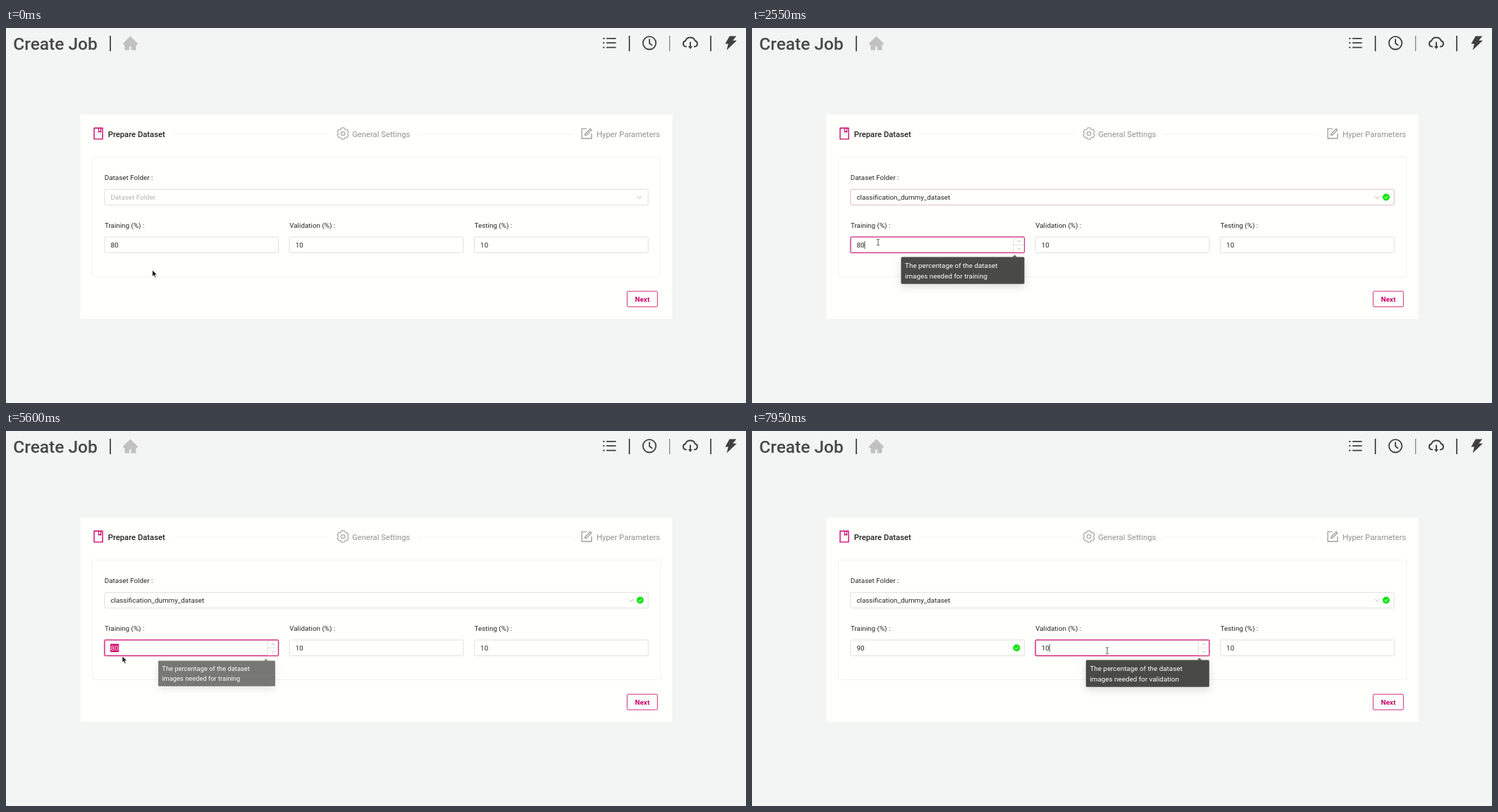
Write an HTML page that moves like this. It is 1050 px wide and 533 px high and loops after 8000 ms.

```html
<!DOCTYPE html>
<html lang="en">
<head>
<meta charset="utf-8">
<title>Create Job</title>
<style>
  html, body { margin: 0; height: 100%; overflow: hidden; background: #f3f5f4; }
  svg { display: block; width: 100vw; height: 100vh; font: 9.85px Roboto, sans-serif; fill: #262626; }
  .line { fill: none; stroke: #d9d9d7; stroke-width: .8; }
  .pink { fill: none; stroke: #d02c80; stroke-width: 1; }
  .glow { fill: none; stroke: #e0569b; stroke-width: 2.2; stroke-opacity: .55; }
  .thin { fill: none; stroke: #bdbdbb; stroke-width: 1; }
  .step { font-size: 11.25px; fill: #929292; }
  .tip { filter: drop-shadow(0 4px 6px rgba(0,0,0,.14)); }
  .tip text { fill: #fff; }
</style>
</head>
<body>
<svg viewBox="0 0 1050 533" id="stage">
  <text x="10.3" y="30.5" font-size="24.5" font-weight="500" fill="#474747">Create Job</text>
  <path d="M148 11v22M884.5 11v22M1000 11v22" stroke="#222" stroke-width="1.5"/>
  <path d="M941.7 11v22" stroke="#555" stroke-width=".9"/>
  <path transform="translate(164.6 9.8) scale(.0231)" fill="#c1c1c1" d="M946.5 505L534.6 93.5a32 32 0 0 0-45.2 0L77.5 505c-12 12-18.8 28.3-18.8 45.3 0 35.3 28.7 64 64 64h43.4V908c0 17.7 14.3 32 32 32H448V716h112v224h265.9c17.7 0 32-14.3 32-32V614.3h43.4c17 0 33.3-6.7 45.3-18.8 24.9-25 24.9-65.5-.1-90.5z"/>
  <g fill="none" stroke="#404040" stroke-width="1.8">
    <path d="M852 14.8h13.5M852 21.2h13.5M852 27.6h13.5M847 14.8h2.4M847 21.2h2.4M847 27.6h2.4"/>
    <circle cx="913" cy="21.3" r="9.2"/>
    <path d="M913 15.5v6.3l4 3"/>
  </g>
  <g transform="translate(957.9 8) scale(.0255)" fill="#404040">
    <path fill="none" stroke="#404040" stroke-width="76" d="M312 722H264a162 162 0 0 1-23-318A290 290 0 0 1 783 404 162 162 0 0 1 760 722H712"/>
    <path d="M624 706h-74V456h-76v250h-82l120 158 120-158z"/>
  </g>
  <path transform="translate(1016.5 9.2) scale(.0237)" fill="#404040" d="M848 359H628L826 109c4-5 0-13-6-13H436c-3 0-6 2-7 4L170 547c-3 5 1 12 7 12h174l-89 358c-2 8 8 13 13 8L853 373c6-5 2-14-5-14z"/>

  <rect x="105.5" y="123" width="840" height="290.5" fill="#fffffc"/>
  <path d="M236 151h222M584 151h220" stroke="#f1f1ee" stroke-width=".9"/>
  <rect x="122.6" y="183.4" width="806" height="170" rx="2" fill="none" stroke="#f0f0ed" stroke-width=".9"/>
  <path transform="translate(121.3 140.3) scale(.019)" fill="#c9006a" fill-rule="evenodd" d="M832 64H192c-18 0-32 14-32 32v832c0 18 14 32 32 32h640c18 0 32-14 32-32V96c0-18-14-32-32-32zM572 136h96v210l-46-34-50 35zM792 888H232V136h280v297c0 13 14 21 25 13l84-60 82 59c10 8 25 0 25-13V136h64z"/>
  <path id="gear" fill="none" stroke="#a9a9a7" stroke-width="1.25" stroke-linejoin="round"/>
  <circle cx="478.1" cy="150" r="2.7" fill="none" stroke="#a9a9a7" stroke-width="1.25"/>
  <g transform="translate(814.2 140.3) scale(.019)" fill="none" stroke="#a0a09e" stroke-width="72">
    <path d="M508 148H148v728h728V512M392 540l388-386 90 90-388 386-92 3z"/>
  </g>
  <text class="step" x="144.7" y="154.7" style="font-weight:500;fill:#222">Prepare Dataset</text>
  <text class="step" x="491.2" y="154.7">General Settings</text>
  <text class="step" x="837.9" y="154.7">Hyper Parameters</text>

  <text x="139.8" y="215.7">Dataset Folder :</text>
  <g id="folder"></g>
  <path id="chevron" class="thin" d="M-3.2-1.7L0 2l3.2-3.7"/>
  <g id="fields"></g>

  <rect x="881.3" y="374.2" width="43" height="22" rx="1.5" fill="#fffffc" stroke="#cb2a7c" stroke-width="1"/>
  <text x="892.6" y="388.5" font-weight="600" fill="#c9006a">Next</text>

  <g id="menu">
    <rect x="139.9" y="254.5" width="771.2" height="28" rx="1.5" fill="#fffffc" style="filter:drop-shadow(0 3px 5px rgba(0,0,0,.14))"/>
    <rect x="139.9" y="257.3" width="771.2" height="22.4" fill="#f4f4f3"/>
    <text x="148.4" y="271.9">classification_dummy_dataset</text>
  </g>
  <g id="tips"></g>
  <path id="arrow" d="M0 0v9.2l2.1-1.9 1.5 3.4 1.6-.7-1.5-3.3h2.9z" fill="#111" stroke="#fff" stroke-width=".7"/>
  <path id="beam" d="M-2-4.2h1.3l.7.6.7-.6H2M0-3.6v7.4M-2 4.4h1.3l.7-.6.7.6H2" fill="none" stroke="#444" stroke-width=".9"/>
</svg>
<script>
const $ = id => document.getElementById(id);
const set = (id, attrs) => { for (const k in attrs) $(id).setAttribute(k, attrs[k]); };
const show = (id, alpha) => set(id, { opacity: alpha });
const ramp = (t, a, b) => Math.min(1, Math.max(0, (t - a) / (b - a)));
const pulse = (t, a, b, c, d) => ramp(t, a, b) - ramp(t, c, d);

// Six gear teeth
let gear = '';
for (let i = 0; i < 6; i++)
  for (const [deg, r] of [[-22, 6.9], [-13, 8.3], [13, 8.3], [22, 6.9]]) {
    const a = (i * 60 + 30 + deg) * Math.PI / 180;
    gear += (gear ? 'L' : 'M') + (478.1 + r * Math.cos(a)) + ' ' + (150 + r * Math.sin(a));
  }
set('gear', { d: gear + 'z' });

const box = (cls, id, x, y, w, h) =>
  `<rect class="${cls}" id="${id}" x="${x}" y="${y}" width="${w}" height="${h}" rx="1.5"/>`;
const check = id => `<g id="${id}"><circle r="5" fill="#10e510"/>
  <path d="M-2.2.1l1.6 1.7 2.7-3.3" fill="none" stroke="#fff" stroke-width="1"/></g>`;

function frame(name, x, y, w, h) {
  return box('line', name + 'Line', x, y, w, h) + box('glow', name + 'Glow', x, y, w, h) +
    box('pink', name + 'Pink', x, y, w, h);
}
function field(name, label, x, value) {
  const r = x + 246.6;
  return `<text x="${x}" y="283.6">${label} (%) :</text>` + frame(name, x, 297, 246.6, 22.4) +
    `<rect id="${name}Sel" x="${x + 8.2}" y="302.6" width="11.9" height="11.6" fill="#d3006d"/>
    <text id="${name}Text" x="${x + 8.5}" y="311.7">${value}</text>
    <path id="${name}Caret" d="M0 303v11" stroke="#222" stroke-width=".8"/>` + check(name + 'Check') +
    `<g id="${name}Spin"><rect x="${r - 15.4}" y="298" width="14.4" height="20.6" fill="#fffffc"/>
    <path class="line" d="M${r - 15.4} 297.6v21.4M${r - 15.4} 308.2h15"/>
    <path class="thin" d="M${r - 9.8} 304l2.2-2 2.2 2M${r - 9.8} 312.6l2.2 2 2.2-2"/></g>`;
}
function tip(id, x, y, tail, lines) {
  const h = lines.length * 15 + 8.4;
  return `<g id="${id}" class="tip"><rect x="${x}" y="${y}" width="175" height="${h}" rx="1.5" fill="#494946"/>
    <path d="M${x + 158} ${tail < 0 ? y : y + h}l3.2 ${2.6 * tail} 3.2 ${-2.6 * tail}z" fill="#494946"/>` +
    lines.map((s, i) => `<text x="${x + 5.6}" y="${y + 15.2 + i * 15}">${s}</text>`).join('') + '</g>';
}

$('folder').innerHTML = frame('select', 139.9, 229.4, 771.2, 22.2) +
  `<text id="selectText" x="148.4" y="243.6"></text>
   <path id="selectCaret" d="M148.8 235v11" stroke="#222" stroke-width=".8"/>` + check('selectCheck');
$('fields').innerHTML = field('train', 'Training', 139.9, '80') +
  field('valid', 'Validation', 402.2, '10') + field('test', 'Testing', 664.6, '10');
$('tips').innerHTML =
  tip('selectTip', 736.1, 171, 1, ['The folder that contains the', 'dataset images needed for the', 'training job']) +
  tip('trainTip', 211.5, 325.4, -1, ['The percentage of the dataset', 'images needed for training']) +
  tip('validTip', 473.8, 325.4, -1, ['The percentage of the dataset', 'images needed for validation']);

// Pointer stops: time, x, y
const path = [[0, 207.7, 344], [300, 207.7, 344], [750, 186, 241], [1100, 186, 241], [1300, 190, 271],
  [1450, 190, 271], [1550, 193, 276], [2050, 193, 276], [2380, 179, 304.5], [3450, 179, 304.5],
  [3700, 175, 331.4], [4300, 175, 331.4], [4520, 171, 316], [4800, 171, 316], [5050, 168, 309],
  [5380, 168, 309], [5560, 165, 320], [6699, 165, 320], [6700, 187, 311.5], [6850, 187, 311.5],
  [7200, 500, 309], [7550, 500, 309], [7800, 504, 312], [8000, 504, 312]];
function pointer(t) {
  const i = path.findIndex(p => p[0] > t), a = path[i - 1], b = path[i];
  const p = ramp(t, a[0], b[0]), e = p * p * (3 - 2 * p);
  return [a[1] + (b[1] - a[1]) * e, a[2] + (b[2] - a[2]) * e];
}

function zoom(id, p, cx, cy) {
  const s = .8 + .2 * p;
  set(id, { opacity: p, transform: `translate(${cx} ${cy}) scale(${s}) translate(${-cx} ${-cy})` });
}
function pop(id, p, x, y) {
  const q = p - 1, s = p ? 1 + 2.7 * q ** 3 + 1.7 * q * q : 0;
  set(id, { transform: `translate(${x} ${y}) scale(${s})` });
}
function typed(name, x, text, focus, selected) {
  $(name + 'Text').textContent = text;
  set(name + 'Text', { fill: selected ? '#fff' : '#262626' });
  show(name + 'Sel', +selected);
  set(name + 'Caret', { opacity: +(focus && !selected),
    transform: `translate(${x + 9 + $(name + 'Text').getComputedTextLength()} 0)` });
}
function outline(name, hover, focus) {
  show(name + 'Pink', Math.max(hover, focus));
  show(name + 'Glow', focus);
}

function draw(t) {
  const chosen = t >= 1850;
  $('selectText').textContent = chosen ? 'classification_dummy_dataset' : 'Dataset Folder';
  set('selectText', { fill: chosen ? '#262626' : '#b4b4b2' });
  show('selectCaret', +(t >= 1050 && t < 1500));
  set('chevron', { transform: `translate(${chosen ? 887 : 899} 240.6)` });
  pop('selectCheck', ramp(t, 1850, 2150), 899.8, 240.5);
  outline('select', pulse(t, 650, 900, 2300, 2600) * .8, pulse(t, 1050, 1300, 2300, 2600) * .35);
  zoom('selectTip', pulse(t, 800, 900, 1250, 1350), 823.6, 197.7);

  const open = ramp(t, 1050, 1250) - ramp(t, 1850, 2050) ** 5;
  set('menu', { opacity: open, transform: `translate(0 254.5) scale(1 ${.8 + .2 * open}) translate(0 -254.5)` });

  const value = t < 3300 ? '80' : t < 3450 ? 'd' : t < 3850 ? 'dd' : t < 6100 ? '80' : t < 6500 ? '9' : '90';
  const trainFocus = t >= 2400 && t < 3850 || t >= 4550 && t < 7200;
  typed('train', 139.9, value, trainFocus, t >= 2700 && t < 3300 || t >= 5200 && t < 6100);
  outline('train', pulse(t, 2200, 2450, 3800, 4050) + pulse(t, 4350, 4500, 7200, 7450),
    pulse(t, 2400, 2650, 3800, 4050) + pulse(t, 4550, 4850, 7200, 7450));
  show('trainSpin', pulse(t, 2250, 2450, 3800, 3950) + pulse(t, 4350, 4500, 5600, 5700) + pulse(t, 6750, 6850, 7000, 7150));
  pop('trainCheck', ramp(t, 6100, 6400), 375.4, 308.3);
  zoom('trainTip', pulse(t, 2350, 2450, 3800, 3900) + pulse(t, 4450, 4555, 5575, 5675) + pulse(t, 6800, 6900, 7100, 7200), 299, 344.6);

  typed('valid', 402.2, '10', t >= 7200, false);
  outline('valid', ramp(t, 7100, 7300), ramp(t, 7200, 7450));
  show('validSpin', ramp(t, 7150, 7350));
  zoom('validTip', ramp(t, 7550, 7650), 561.3, 344.6);

  const [x, y] = pointer(t);
  const onText = y > 297 && y < 319 && (x < 371 || x > 402 && x < 633);
  set('beam', { opacity: +onText, transform: `translate(${x} ${y})` });
  set('arrow', { opacity: +!onText, transform: `translate(${x} ${y})` });
}

for (const id of ['validCheck', 'testCheck']) pop(id, 0, 0, 0);
typed('test', 664.6, '10', false, false);
outline('test', 0, 0);
show('testSpin', 0);

const start = performance.now();
(function loop(now) {
  draw(Math.max(0, now - start) % 8000);
  requestAnimationFrame(loop);
})(start);
</script>
</body>
</html>
```
